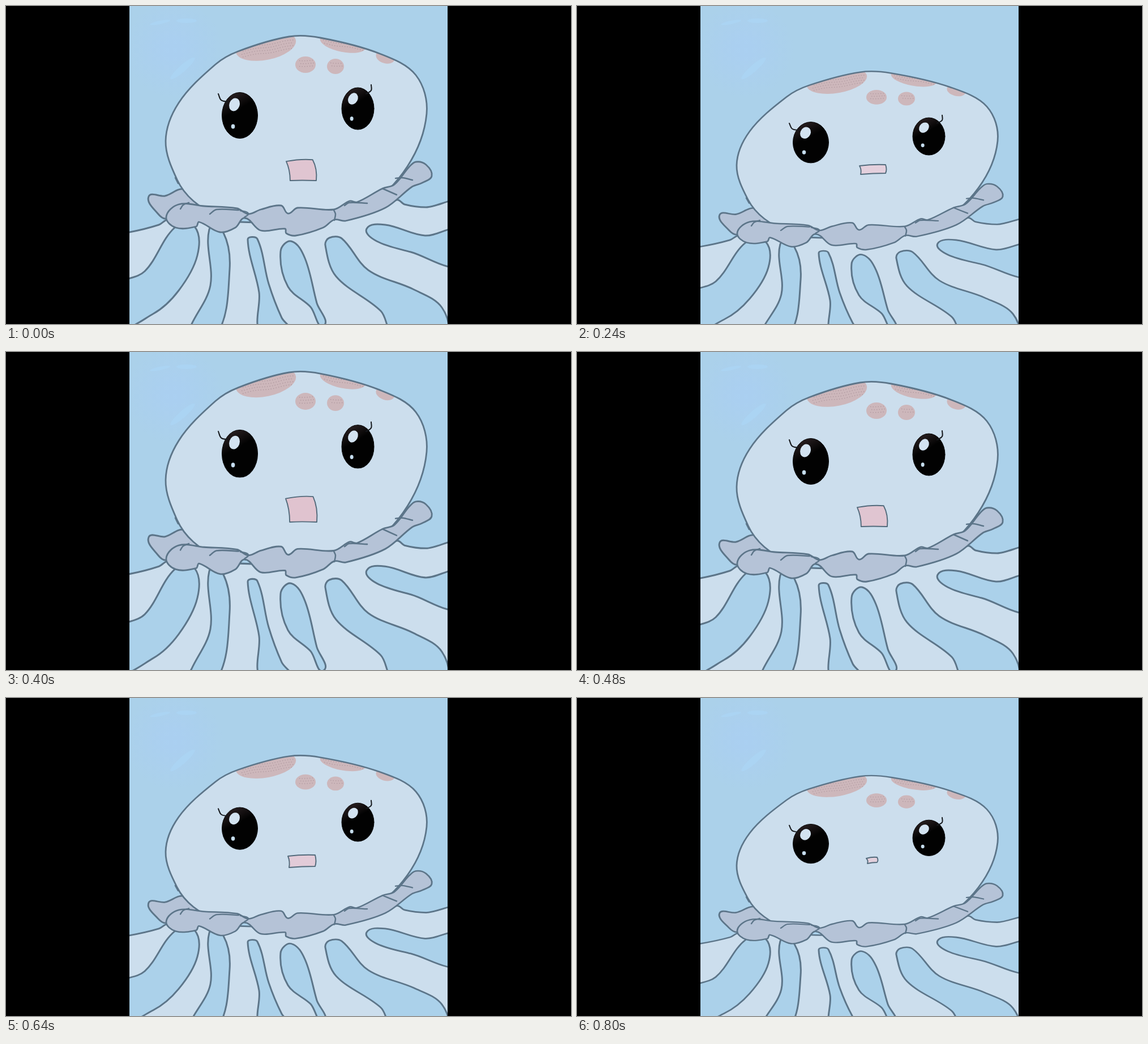
Recreate the animation shown at these times as an HTML page with a canvas. Size 998 by 561 pixels, loop 880 ms.

```html
<!DOCTYPE html>
<html lang="en">
<head>
<meta charset="utf-8">
<title>Jellyfish</title>
<style>
  html, body { margin: 0; width: 100%; height: 100%; overflow: hidden; background: #000; }
  canvas { display: block; }
</style>
</head>
<body>
<canvas id="stage" width="998" height="561"></canvas>
<script>
const ctx = document.getElementById('stage').getContext('2d');
const STEP = 80, FLOOR = 635, LEFT = 218, SIDE = 562;
const WATER = '#abd1ea', SKIN = '#ccdeed', FRILL = '#b5c3d7', LINE = '#5c7589', SPOT = '#cdb7bb';

// scale: vertical stretch above FLOOR; mouth: left, top, width, height
const poses = {
  tall: { scale: 1.031, mouth: [494, 256, 55, 44], lips: '#e0c3cf' },
  open: { scale: 1, mouth: [495, 272, 53, 36], lips: '#e0c5d1' },
  mid: { scale: 0.916, mouth: [498, 278, 49, 20], lips: '#e2cbd8' },
  low: { scale: 0.892, mouth: [499, 281, 47, 15], lips: '#e4d0dd' },
  squat: { scale: 0.855, mouth: [511, 282, 20, 9], lips: '#e2d0dc' }
};
const sequence = 'open tall open low open tall open low mid low squat'.split(' ');

// Smooth path through a flat list of x, y pairs
function curve(p, closed = true) {
  const n = p.length / 2, path = new Path2D();
  const at = i => {
    const k = closed ? (i + n) % n : Math.max(0, Math.min(n - 1, i));
    return [p[2 * k], p[2 * k + 1]];
  };
  path.moveTo(p[0], p[1]);
  for (let i = 0; i < (closed ? n : n - 1); i++) {
    const [a, b, c, d] = [at(i - 1), at(i), at(i + 1), at(i + 2)];
    // Tangents follow the segment length, so uneven spacing stays smooth
    const len = Math.hypot(c[0] - b[0], c[1] - b[1]);
    const pull = (u, v) => len / 3 / (Math.hypot(v[0] - u[0], v[1] - u[1]) || 1);
    const s = pull(a, c), t = pull(b, d);
    path.bezierCurveTo(b[0] + (c[0] - a[0]) * s, b[1] + (c[1] - a[1]) * s,
      c[0] - (d[0] - b[0]) * t, c[1] - (d[1] - b[1]) * t, c[0], c[1]);
  }
  return path;
}

function oval(x, y, rx, ry, turn = 0) {
  const path = new Path2D();
  path.ellipse(x, y, rx, ry, turn, 0, 7);
  return path;
}

function paint(path, fill, stroke, width = 3) {
  if (fill) { ctx.fillStyle = fill; ctx.fill(path); }
  if (stroke) { ctx.strokeStyle = stroke; ctx.lineWidth = width; ctx.stroke(path); }
}

const arms = curve([190, 401, 218, 399, 270, 386, 286, 377, 500, 380, 691, 342, 704, 350,
  742, 355, 810, 350, 810, 600, 190, 600]);

const gaps = [];
const gap = (...p) => gaps.push(curve(p));
gap(190, 497, 245, 468, 298, 391, 333, 389, 338, 440, 305, 502, 260, 543, 190, 566);
gap(359, 394, 361, 493, 328, 561, 320, 580, 372, 580, 395, 465, 384, 400);
gap(427, 412, 444, 411, 464, 490, 487, 550, 506, 580, 451, 580, 447, 505);
gap(485, 433, 504, 415, 528, 445, 549, 524, 561, 564, 538, 531, 498, 495);
gap(564, 422, 571, 409, 593, 410, 640, 466, 720, 500, 770, 532, 775, 580, 686, 580, 662, 538, 583, 477);
gap(637, 393, 670, 386, 740, 405, 810, 396, 810, 458, 715, 434, 655, 415);

const head = curve([500, 54, 555, 56, 660, 84, 724, 122, 743, 190, 709, 283, 640, 348, 500, 378,
  370, 365, 331, 344, 302, 306, 282, 238, 305, 171, 370, 103, 410, 80]);

const flap = curve([252, 336, 281, 335, 314, 323, 340, 345, 284, 375, 268, 366]);

const frillTop = [283, 372, 305, 350, 350, 353, 408, 357, 428, 367, 450, 359, 486, 352, 498, 366,
  515, 356, 579, 359, 607, 344, 620, 346, 665, 322, 686, 315, 712, 284, 724, 275, 742, 280, 752, 300];
const frillBase = [735, 312, 717, 319, 670, 356, 600, 379, 580, 377, 560, 391, 512, 405, 495, 401,
  493, 393, 450, 396, 422, 374, 405, 391, 378, 399, 341, 381, 336, 389, 300, 391];
const frill = curve(frillTop.concat(frillBase));

const folds = [];
const fold = (...p) => folds.push(curve(p, false));
fold(308, 358, 313, 351, 323, 347);
fold(360, 367, 372, 359, 411, 360);
fold(421, 373, 428, 366, 414, 361);
fold(579, 360, 582, 367, 580, 378);
fold(598, 352, 606, 347, 638, 348);
fold(665, 322, 690, 333);
fold(688, 304, 700, 303, 718, 307);
fold(299, 303, 304, 313);

const spots = [
  oval(459, 71, 54, 24, -0.2),
  oval(595, 66, 41, 15, 0.2),
  oval(529, 103.5, 18, 14.5),
  oval(582, 106.5, 15, 13.5),
  oval(670, 90, 17, 11, 0.3)
];

const lashes = [
  curve([375, 155, 380, 166, 391, 169], false),
  curve([645, 139, 645, 149, 636, 155], false)
];

function speckle(x0, x1, y0, rows, slope) {
  for (let row = 0; row < rows; row++) {
    for (let x = x0 + row % 2 * 2; x < x1; x += 4.5) {
      ctx.fillRect(x, y0 + row * 5 + (x - x0) * slope + Math.sin(x / 9), 1.4, 1.3);
    }
  }
}

function drawSpots() {
  ctx.save();
  ctx.clip(head);
  spots.forEach(s => paint(s, SPOT));
  const area = new Path2D();
  spots.slice(0, 4).forEach(s => area.addPath(s));
  ctx.clip(area);
  ctx.fillStyle = '#ad969d';
  speckle(416, 508, 74, 4, -0.16);
  speckle(560, 630, 60, 2, 0.17);
  speckle(518, 543, 95, 3, 0.02);
  speckle(573, 595, 99, 2, 0.06);
  ctx.restore();
}

function drawEye(x, y, rx, ry, shineTurn) {
  const tint = ctx.createLinearGradient(x - rx / 2, y - ry, x, y - ry * 0.3);
  tint.addColorStop(0, '#2c2224');
  tint.addColorStop(1, '#020202');
  paint(oval(x, y, rx, ry), tint, '#050505', 1);
  paint(oval(x - rx * 0.3, y - ry * 0.47, rx * 0.29, ry * 0.29, shineTurn), '#d3e3f1');
  paint(oval(x - rx * 0.38, y + ry * 0.48, rx * 0.105, ry * 0.1), '#c6ddef');
}

function drawMouth([x, y, w, h], fill) {
  const path = new Path2D();
  path.moveTo(x, y + h * 0.06);
  path.quadraticCurveTo(x + w / 2, y - w * 0.05, x + w * 0.88, y - h * 0.02);
  path.quadraticCurveTo(x + w * 1.04, y + h * 0.42, x + w, y + h);
  path.quadraticCurveTo(x + w / 2, y + h * 0.97, x + w * 0.13, y + h);
  path.quadraticCurveTo(x + w * 0.13, y + h * 0.48, x, y + h * 0.06);
  path.closePath();
  paint(path, fill, '#526a7b', 1.9);
}

// Shallow mouths have nearly upright sides
function drawFlatMouth([x, y, w, h], fill) {
  const path = new Path2D();
  path.moveTo(x, y + 1);
  path.quadraticCurveTo(x + w / 2, y - 2, x + w - 1, y - 1);
  path.quadraticCurveTo(x + w + 2, y + h / 2, x + w - 1, y + h - 1);
  path.quadraticCurveTo(x + w / 2, y + h - 1, x + 2, y + h + 1);
  path.quadraticCurveTo(x + 4, y + h / 2, x, y + 1);
  path.closePath();
  paint(path, fill, '#526a7b', 1.9);
}

function drawWater() {
  ctx.fillStyle = WATER;
  ctx.fillRect(LEFT, 0, SIDE, 561);
  const glow = ctx.createRadialGradient(296, 75, 15, 296, 75, 88);
  glow.addColorStop(0, 'rgba(170,207,241,.9)');
  glow.addColorStop(1, 'rgba(170,207,241,0)');
  ctx.fillStyle = glow;
  ctx.fillRect(LEFT, 0, 180, 170);
  const sheen = '#abd4f3';
  paint(oval(272, 29, 18, 3, -0.2), sheen);
  paint(oval(319, 26, 18, 4), sheen);
  paint(oval(312, 110, 28, 6, -0.72), sheen);
}

function draw(pose) {
  ctx.fillStyle = '#000';
  ctx.fillRect(0, 0, 998, 561);
  ctx.save();
  ctx.beginPath();
  ctx.rect(LEFT, 0, SIDE, 561);
  ctx.clip();
  drawWater();

  ctx.save();
  ctx.translate(0, FLOOR * (1 - pose.scale));
  ctx.scale(1, pose.scale);
  paint(arms, SKIN, LINE);
  gaps.forEach(g => paint(g, WATER, LINE));
  paint(flap, FRILL, LINE);
  paint(head, SKIN);
  drawSpots();
  paint(head, null, LINE, 2.8);
  paint(frill, FRILL, LINE, 2.8);
  folds.forEach(f => paint(f, null, LINE, 2.5));
  drawEye(413, 193, 31.5, 40.5, 0.35);
  drawEye(621.5, 181, 28.5, 37, 0.5);
  lashes.forEach(l => paint(l, null, '#15181c', 2));
  ctx.restore();

  const mouth = pose.mouth[3] > 25 ? drawMouth : drawFlatMouth;
  mouth(pose.mouth, pose.lips);
  ctx.restore();
}

ctx.lineCap = ctx.lineJoin = 'round';
const start = performance.now();
function tick() {
  const step = Math.floor((performance.now() - start) / STEP) % sequence.length;
  draw(poses[sequence[step]]);
  requestAnimationFrame(tick);
}
tick();
</script>
</body>
</html>
```
